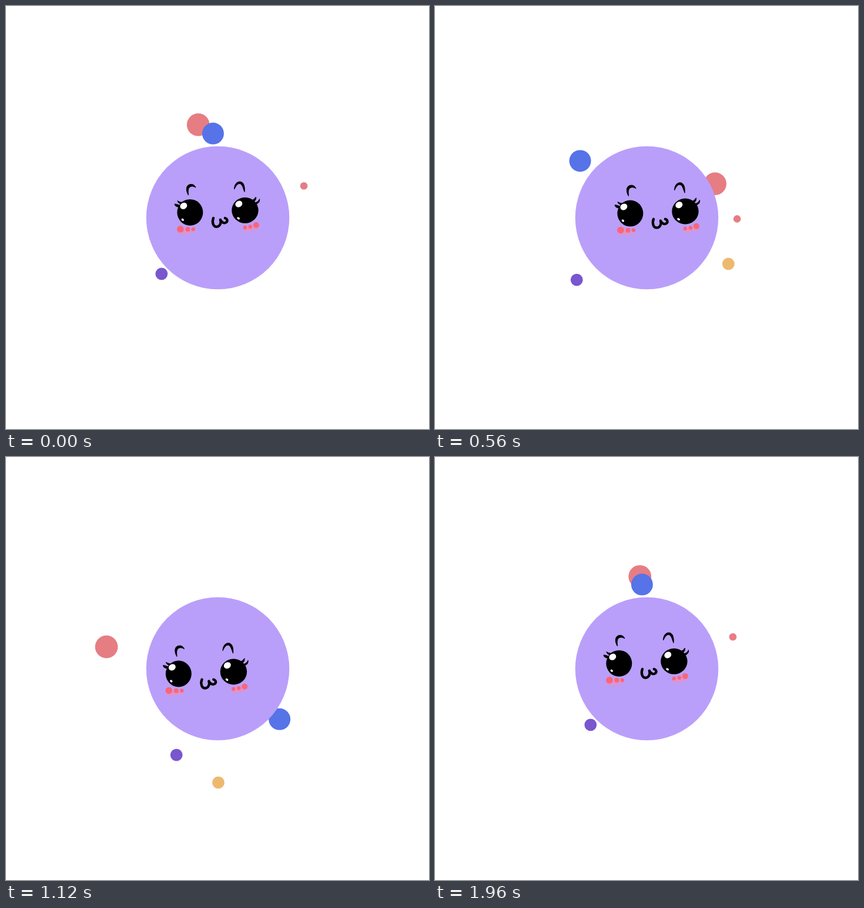
These frames come from a looping animation (720x720 px, 2 s). An HTML page:

```html
<!DOCTYPE html>
<html lang="en">
<head>
<meta charset="utf-8">
<title>Orbiting dots</title>
<style>
html, body { margin: 0; width: 100%; height: 100%; overflow: hidden; background: #fff; }
svg { display: block; width: 100vw; height: 100vh; }
</style>
</head>
<body>
<svg viewBox="0 0 720 720">
  <defs>
    <filter id="soft" x="-30%" y="-80%" width="160%" height="260%"><feGaussianBlur stdDeviation="2.2"/></filter>
    <filter id="edge" x="-30%" y="-30%" width="160%" height="160%"><feGaussianBlur stdDeviation=".6"/></filter>
  </defs>
  <g id="dots"></g>
  <circle cx="360.5" cy="360.5" r="121.8" fill="#b99ffa"/>
  <g id="face">
    <g fill="#f48cb4" opacity=".75" filter="url(#soft)">
      <ellipse cx="305.5" cy="383.5" rx="14" ry="4.5"/>
      <ellipse cx="416.5" cy="378.5" rx="13" ry="4.5" transform="rotate(-10 416.5 378.5)"/>
    </g>
    <g fill="#fb6577" filter="url(#edge)">
      <circle cx="296.8" cy="379.8" r="5.8"/>
      <circle cx="309.3" cy="380" r="4"/>
      <circle cx="318.8" cy="380" r="3.2"/>
      <circle cx="425.8" cy="373" r="5"/>
      <circle cx="415.8" cy="375.8" r="3.2"/>
      <circle cx="406.8" cy="377" r="3.2"/>
    </g>
    <ellipse cx="313.3" cy="351.3" rx="22" ry="22.4"/>
    <ellipse cx="406.9" cy="347.8" rx="22.7" ry="22"/>
    <g fill="#fff">
      <ellipse cx="302.3" cy="340.3" rx="6.2" ry="5.3" transform="rotate(-30 302.3 340.3)"/>
      <ellipse cx="396.3" cy="337" rx="6.2" ry="5.3" transform="rotate(-30 396.3 337)"/>
      <ellipse cx="300.8" cy="363.8" rx="2.4" ry="1.8" transform="rotate(40 300.8 363.8)"/>
      <ellipse cx="395.6" cy="361.3" rx="2.6" ry="1.8" transform="rotate(30 395.6 361.3)"/>
    </g>
    <!-- brows and lashes -->
    <path stroke="#000" stroke-linejoin="round" d="M310.5 322C304.5 312 307.5 304 314 303.5C319 303 321.5 305.5 323 309C319 306.5 315.500 306.500 313 308C309.500 310.500 310 316 310.500 322Z
             M388.500 312C388.500 305 392 299 398 299C404.500 299 407 307 406 316.500C403.500 310 402 303 398 302.500C394 302 391.500 306 388.500 312Z
             M287 337C289 337 292 337.500 295.500 339.500L294 342C290 342 287.500 340.500 287 337Z
             M292 331.500C294.500 333.500 296.500 333.500 300 334.500L297 336.500C294 336 292.500 334 292 331.500Z
             M425.500 325C426 328.500 424.500 331.500 421.500 333.500L418.500 331C421.500 329.500 423.500 327.500 425.500 325Z
             M431.500 328.500C432 332 431 335 426.500 337L425 334.500C428.500 333.500 430.500 331 431.500 328.500Z"/>
    <path d="M353 361C350.500 367 352 376 358.500 375.800C363.500 375.600 367 370 364.800 363.800C367.500 369 371.500 370.500 374.800 368.300C378 366 376.500 362 372.800 361" fill="none" stroke="#000" stroke-width="4.300" stroke-linecap="round" stroke-linejoin="round"/>
  </g>
</svg>
<script>
const LOOP = 2000, STEP = 40, LAP = 1950;
const NS = 'http://www.w3.org/2000/svg';
const dots = document.getElementById('dots');
const face = document.getElementById('face');

function make(tag, attrs) {
  const el = document.createElementNS(NS, tag);
  for (const key in attrs) el.setAttribute(key, attrs[key]);
  return el;
}

// Elliptic path from its top point; dir 1 is clockwise, 0 counterclockwise.
function orbit(cx, cy, rx, ry, dir, lap = LAP, phase = 0) {
  const arc = y => `A${rx} ${ry} 0 0 ${dir} ${cx} ${y}`;
  const path = make('path', { d: `M${cx} ${cy - ry}${arc(cy + ry)}${arc(cy - ry)}` });
  const length = path.getTotalLength();
  return t => {
    const p = t % lap / lap;
    const eased = p - Math.sin(2 * Math.PI * p) / (2 * Math.PI);
    return path.getPointAtLength((eased + phase) % 1 * length);
  };
}

const movers = [
  [19.4, '#e67d83', orbit(327.2, 363.4, 161.3, 161.3, 1, 1704)],
  [18.5, '#5673e8', orbit(352.4, 359.7, 142.6, 142.6, 0)],
  [10.4, '#7857cf', orbit(264.8, 487.7, 31.9, 31.9, 0)],
  [10.4, '#edb96f', orbit(432.9, 499.5, 90, 90, 1)],
  [6.3, '#e67d83', orbit(435, 339, 86, 60, 1, LAP, 0.171)]
].map(([r, fill, at]) => ({ el: dots.appendChild(make('circle', { r, fill })), at }));

const faceAt = orbit(312.7, 360.8, 33, 9.9, 1, LAP, 0.995);
const faceHome = faceAt(0);

function draw(now) {
  const t = Math.floor(now % LOOP / STEP) * STEP;
  for (const { el, at } of movers) {
    const { x, y } = at(t);
    el.setAttribute('cx', x);
    el.setAttribute('cy', y);
  }
  const { x, y } = faceAt(t);
  face.setAttribute('transform', `translate(${x - faceHome.x} ${y - faceHome.y})`);
}

let start;
function tick(now) {
  start ??= now;
  draw(now - start);
  requestAnimationFrame(tick);
}
draw(0);
requestAnimationFrame(tick);
</script>
</body>
</html>
```
